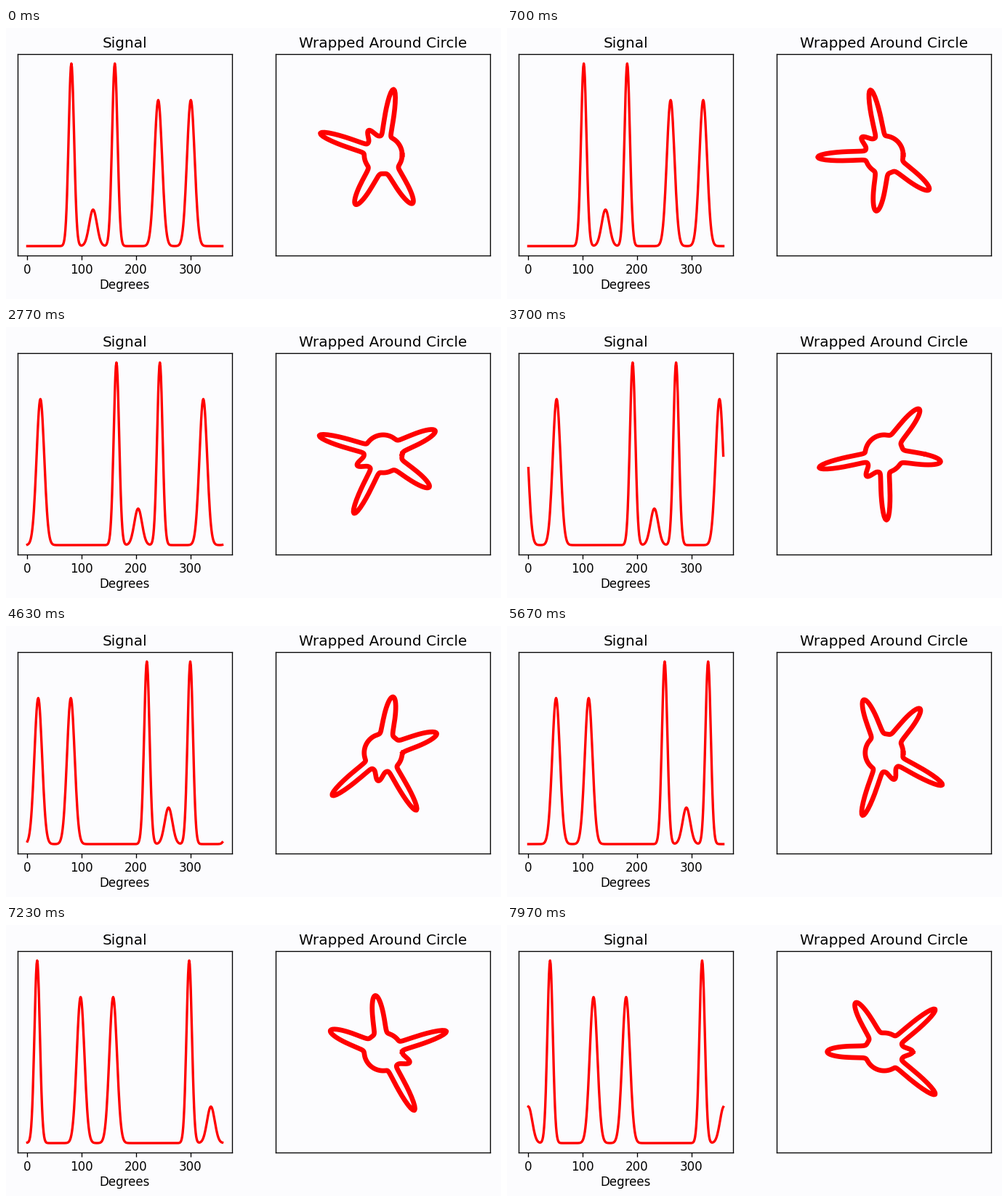
These frames come from a looping animation (681 px wide and 374 px high, 8000 ms). A matplotlib script:

```python
import numpy as np
import matplotlib.pyplot as plt
from matplotlib.animation import FuncAnimation

W, H, DPI = 681, 374, 120
FRAMES, LOOP_MS = 400, 8000
STEPS = 240          # one-degree shifts per loop
PAPER = "#fcfcfe"
TOP, BOTTOM = 36.4, 313.6
UNIT = 65.3          # pixels per unit of radius
BASE = 0.4           # radius where the signal is zero

# (centre in degrees, height, spread)
PEAKS = [(80, 1.0, 50), (120, 0.2, 100), (160, 1.0, 50),
         (240, 0.8, 100), (300, 0.8, 100)]

deg = np.arange(360)
theta = np.radians(deg)
signal = sum(h * np.exp(-(deg - c) ** 2 / s) for c, h, s in PEAKS)

plt.rcParams["font.family"] = "DejaVu Sans"
fig = plt.figure(figsize=(W / DPI, H / DPI), dpi=DPI, facecolor=PAPER)


def add_panel(left, right, title):
    ax = fig.add_axes([left / W, 1 - BOTTOM / H,
                       (right - left) / W, (BOTTOM - TOP) / H],
                      facecolor=PAPER)
    ax.set_title(title, fontsize=12, pad=5.6)
    ax.set_yticks([])
    return ax


flat = add_panel(16, 311, "Signal")
flat.set_xlabel("Degrees", labelpad=1.7)
flat.set_xticks([0, 100, 200, 300])
flat.set_xlim(-17.95, 376.95)
flat.set_ylim(-0.05, 1.05)
flat_line, = flat.plot(deg, signal, color="red", lw=2)

ring = add_panel(371.4, 666.4, "Wrapped Around Circle")
ring.set_xticks([])
half_w, half_h = 295 / 2 / UNIT, (BOTTOM - TOP) / 2 / UNIT
ring.set_xlim(-half_w, half_w)
ring.set_ylim(-half_h, half_h)
ring_line, = ring.plot([], [], color="red", lw=4)


def update(frame):
    """Shift the signal in whole degrees and wrap it."""
    y = np.roll(signal, round(frame * STEPS / FRAMES) + 1)
    r = BASE + y
    flat_line.set_ydata(y)
    ring_line.set_data(r * np.cos(theta), r * np.sin(theta))
    return flat_line, ring_line


anim = FuncAnimation(fig, update, frames=FRAMES, interval=LOOP_MS / FRAMES,
                     init_func=lambda: update(0), repeat=True, repeat_delay=0)
plt.show()
```
